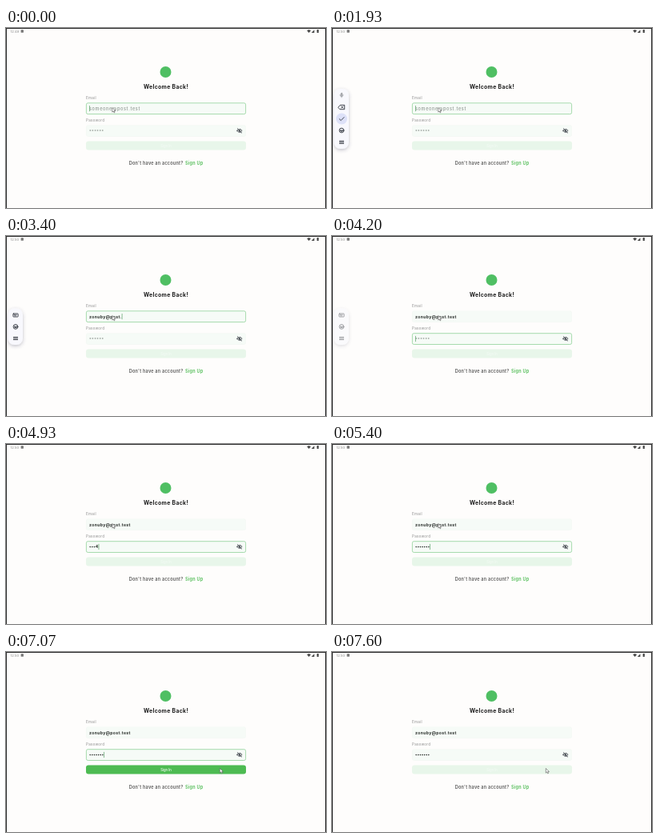
Write an HTML page that moves like this. It is 400 by 225 pixels and loops after 8000 ms.

```html
<!DOCTYPE html>
<html lang="en">
<head>
<meta charset="utf-8">
<title>Sign in</title>
<style>
  html, body { margin: 0; width: 100%; height: 100%; overflow: hidden; background: #fefdfc; }
  svg { display: block; width: 100vw; height: 100vh; }
  text { font-family: Inter, "Open Sans", sans-serif; font-weight: 500; }
  .title { font-size: 6.9px; font-weight: 700; fill: #1b1b1b; letter-spacing: .32px; }
  .label { font-size: 4.6px; fill: #a0a0a0; letter-spacing: .23px; }
  .hint { font-size: 5.5px; fill: #8f9791; letter-spacing: .66px; }
  .typed { font-size: 5.1px; font-weight: 700; fill: #2a2e2b; letter-spacing: .36px; }
  .small { font-size: 5.5px; font-weight: 600; fill: #5a5a5a; letter-spacing: .24px; }
  .field { fill: #f6fbf7; stroke: #f1f7f2; stroke-width: .6; }
  .focus { fill: none; stroke: #86cf90; stroke-width: .7; }
  .icon { fill: none; stroke: #333740; stroke-width: .9; stroke-linecap: round; stroke-linejoin: round; }
</style>
</head>
<body>
<svg viewBox="0 0 400 225" preserveAspectRatio="none">
  <defs>
    <filter id="shadow" x="-60%" y="-30%" width="220%" height="160%">
      <feDropShadow dx="0" dy="1.6" stdDeviation="2" flood-color="#40405c" flood-opacity=".32"/>
    </filter>
    <g id="smile" class="icon">
      <circle r="2.9"/>
      <path d="M-1.1-.8v.1M1.1-.8v.1M-1.5.7Q0 2.4 1.5.7Z"/>
    </g>
    <path id="menu" class="icon" d="M-2.6-1.6h5.2M-2.6 0h5.2M-2.6 1.6h5.2"/>
  </defs>
  <rect width="400" height="225" fill="#fefdfc"/>
  <path d="M0 .5H400M.5 0V225M399.5 0V225" stroke="#2c2c2c"/>

  <text id="clock" x="5.5" y="5.5" font-size="4.1" fill="#9a9a9a"></text>
  <rect x="18.6" y="2.3" width="3.3" height="3.4" rx=".5" fill="#777"/>
  <g fill="#444">
    <path d="M376.2 3.2Q378.6 1.4 381 3.2L378.6 6Z"/>
    <path d="M385.4 2.2V6H381.8Z"/>
    <rect x="388.6" y="2.1" width="2.2" height="4" rx=".5"/>
  </g>

  <circle cx="199.5" cy="55" r="7" fill="#4fbf63"/>
  <text class="title" x="200" y="75.5" text-anchor="middle">Welcome Back!</text>

  <text class="label" x="100" y="88.7">Email</text>
  <rect class="field" x="100.4" y="93.8" width="199.2" height="13.8" rx="2"/>
  <rect class="focus" id="mailFocus" x="100.4" y="93.8" width="199.2" height="13.8" rx="2"/>
  <text class="hint" id="mailHint" x="104" y="102.6">someone@post.test</text>
  <text class="typed" id="mail" x="104" y="102.5"></text>

  <text class="label" x="100" y="116.5">Password</text>
  <rect class="field" x="100.4" y="121.7" width="199.2" height="13.8" rx="2"/>
  <rect class="focus" id="passFocus" x="100.4" y="121.7" width="199.2" height="13.8" rx="2"/>
  <text id="passHint" x="104" y="131" font-size="5" letter-spacing=".5" fill="#858d87">******</text>
  <g id="dots" fill="#2a2e2b"></g>
  <text class="typed" id="pass" y="130.4"></text>
  <rect id="caret" width=".7" height="7.2" fill="#5a9f66"/>

  <g class="icon" transform="translate(292 128.4)">
    <path d="M-3.1 0Q0-4 3.1 0Q0 4-3.1 0Z"/>
    <circle r="1.2" fill="#333740" stroke="none"/>
    <g id="slash">
      <path d="M-2-2.9L2.9 2" stroke="#f6fbf7" stroke-width=".6"/>
      <path d="M-2.6-2.6L2.6 2.6"/>
    </g>
  </g>

  <rect x="100" y="141.4" width="200" height="11.2" rx="3" fill="#e8f6ea"/>
  <rect id="active" x="100" y="141.4" width="200" height="11.2" rx="3" fill="#4dbb52"/>
  <text id="action" x="200" y="148.5" font-size="4.2" text-anchor="middle" fill="#fff">Sign In</text>

  <text class="small" x="153.8" y="170.6">Don't have an account?</text>
  <text class="small" x="224" y="170.6" style="fill:#4dbb52">Sign Up</text>

  <g id="bar">
    <rect id="panel" x="2.5" width="18.5" rx="8" fill="#f8f8fd" filter="url(#shadow)"/>
    <g id="tall">
      <g class="icon" transform="translate(12 84)" style="stroke:#a2a4aa">
        <rect x="-.9" y="-2.7" width="1.8" height="3.4" rx=".9" fill="#a2a4aa"/>
        <path d="M-2-.3Q-2 1.7 0 1.7T2-.3M0 1.7V2.8"/>
      </g>
      <path class="icon" transform="translate(12 99)" d="M-4 0L-1.8-2.7H3.7V2.7H-1.8ZM-.5-1.2L1.9 1.2M1.9-1.2L-.5 1.2"/>
      <circle cx="12" cy="113.5" r="7" fill="#dde1f8"/>
      <path class="icon" d="M9.2 113.7L11.2 115.6L15 111.6"/>
      <use href="#smile" x="12" y="128"/>
      <use href="#menu" x="12" y="142.8"/>
    </g>
    <g id="short">
      <g class="icon" transform="translate(12 99)">
        <rect x="-3.1" y="-2" width="6.2" height="4" rx=".5"/>
        <path d="M-1.8-.6H1.8M-1.3.8H1.3" stroke-dasharray=".4 .9"/>
      </g>
      <use href="#smile" x="12" y="113.4"/>
      <use href="#menu" x="12" y="128"/>
    </g>
  </g>

  <path id="cursor" d="M0 0V5.6L1.4 4.4L2.3 6.4L3.2 6L2.4 4.1H4.2Z" fill="#fff" stroke="#555" stroke-width=".6" stroke-linejoin="round"/>
</svg>
<script>
const LOOP = 8000, LEFT = 104, GAP = 2.6;
const EMAIL = "zonuby@post.test", SECRET = "1234567";

// [time, number of characters]
const mailKeys = [[0, 0], [2600, 2], [2670, 4], [2930, 6], [3070, 7], [3130, 8], [3200, 9],
  [3270, 10], [3330, 11], [3400, 12], [3530, 14], [3670, 16]];
const passKeys = [[0, 0], [4670, 1], [4730, 2], [4870, 3], [4930, 4], [5070, 5], [5200, 7]];
// [start, end, x, y]
const moves = [[5930, 6130, 290, 129.5], [6730, 7070, 267.3, 145.5]];

const ui = {};
document.querySelectorAll("[id]").forEach(el => ui[el.id] = el);

const set = (el, attrs) => { for (const k in attrs) el.setAttribute(k, attrs[k]); };
const show = (el, v) => el.setAttribute("opacity", +v);
const within = (t, a, b) => t >= a && t < b;
const ramp = (t, a, b) => Math.min(1, Math.max(0, (t - a) / (b - a)));
const ease = p => p * p * (3 - 2 * p);
const held = (keys, t) => keys.reduce((v, k) => t >= k[0] ? k[1] : v, 0);

const dots = [...SECRET].map((_, i) => {
  const dot = document.createElementNS("http://www.w3.org/2000/svg", "circle");
  set(dot, { cx: LEFT + 1.2 + i * GAP, cy: 128.6, r: .8 });
  return ui.dots.appendChild(dot);
});

function drawBar(t) {
  const p = ease(ramp(t, 2050, 2200));
  set(ui.panel, { y: 76 + 14.5 * p, height: 75 - 29.5 * p });
  show(ui.tall, 1 - p);
  show(ui.short, p);
  show(ui.bar, t < 1930 || t >= 4330 ? 0 : t < 4200 ? 1 : .5);
}

function drawMail(t) {
  const n = held(mailKeys, t);
  ui.mail.textContent = EMAIL.slice(0, n);
  show(ui.mailHint, !n);
  show(ui.mailFocus, t < 4200);
  return LEFT + (n ? ui.mail.getComputedTextLength() : 0);
}

function drawPass(t) {
  const n = held(passKeys, t);
  const open = within(t, 6470, 6670);
  const peek = !open && n > 0 && t < 5400;
  const hidden = open ? 0 : n - peek;
  dots.forEach((d, i) => show(d, i < hidden));
  ui.pass.setAttribute("x", LEFT + hidden * GAP);
  ui.pass.textContent = open ? SECRET : peek ? SECRET[n - 1] : "";
  show(ui.passHint, !n);
  show(ui.passFocus, within(t, 4200, 7270));
  show(ui.slash, !open);
  return LEFT + hidden * GAP + (open || peek ? ui.pass.getComputedTextLength() : 0);
}

function drawCursor(t) {
  let x = 132.8, y = 99.5;
  for (const [a, b, tx, ty] of moves) {
    const p = ease(ramp(t, a, b));
    x += (tx - x) * p;
    y += (ty - y) * p;
  }
  ui.cursor.setAttribute("transform", `translate(${x} ${y})`);
}

function draw(t) {
  ui.clock.textContent = t < 1930 ? "12:49" : "12:50";
  drawBar(t);
  const mailEnd = drawMail(t), passEnd = drawPass(t), onMail = t < 4200;
  set(ui.caret, { x: onMail ? mailEnd : passEnd, y: onMail ? 97 : 124.9 });
  show(ui.caret, !within(t, 330, 1930) && !within(t, 5700, 6200) && t < 7270);
  const on = ramp(t, 5400, 5730) - ramp(t, 7200, 7470);
  show(ui.active, on);
  show(ui.action, .5 + .5 * on);
  drawCursor(t);
}

const start = performance.now();
function tick() {
  draw((performance.now() - start) % LOOP);
  requestAnimationFrame(tick);
}
tick();
</script>
</body>
</html>
```
